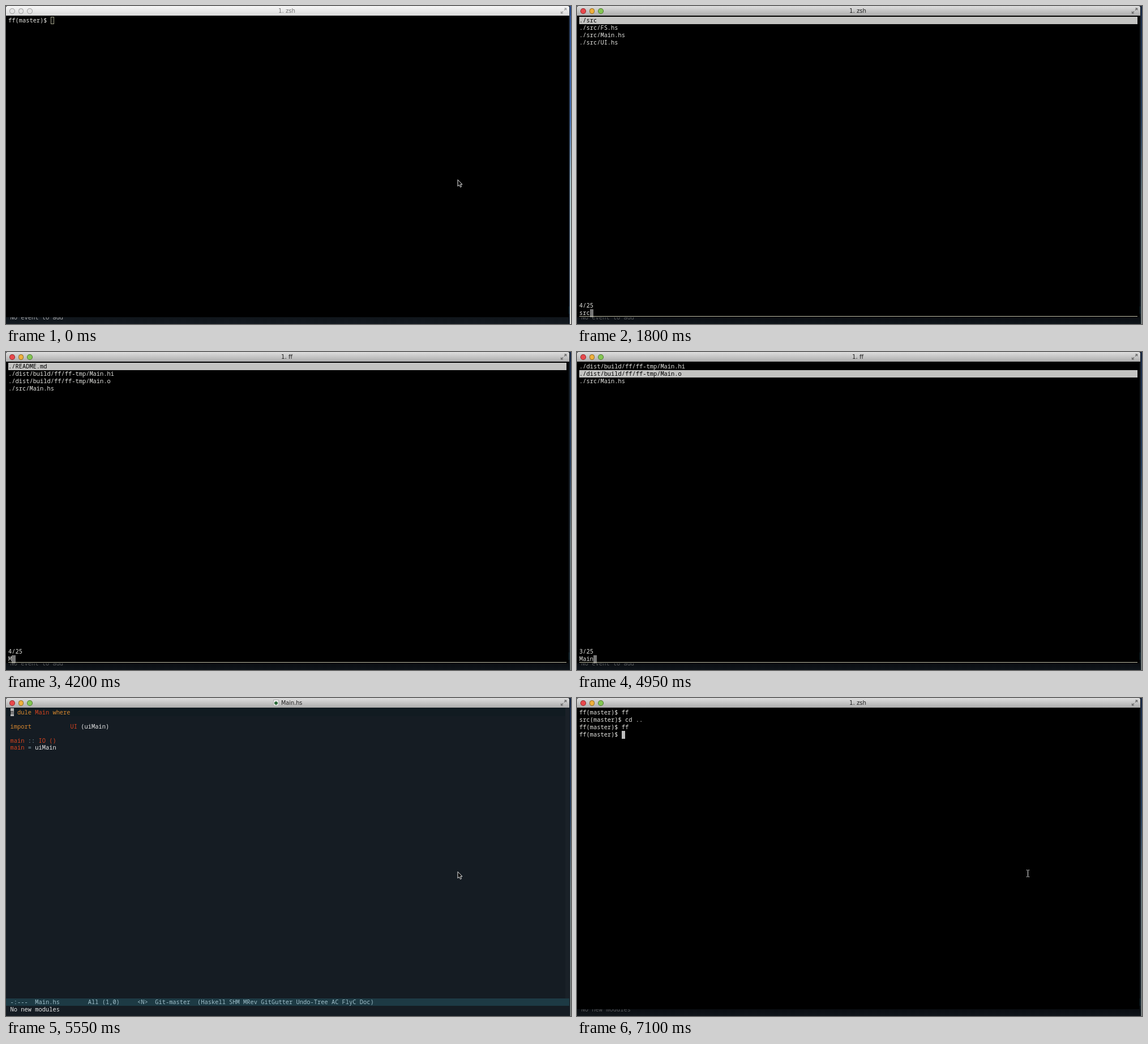
Recreate the animation shown at these times as an HTML page. Size 998 by 561 pixels, loop 7.3 s.

```html
<!DOCTYPE html>
<html lang="en">
<head>
<meta charset="utf-8">
<title>ff</title>
<style>
  html, body { margin: 0; width: 100%; height: 100%; overflow: hidden; background: #10151b; }
  #stage { position: relative; width: 998px; height: 561px; overflow: hidden; background: #151c23;
           font: 10.4px/13.25px "Noto Sans Mono", monospace; white-space: pre; }
  #stage * { box-sizing: border-box; }
  #stage div, svg { position: absolute; }

  #bar { left: 0; top: 0; width: 995px; height: 17px; border-radius: 3px 3px 0 0;
         background: linear-gradient(#dedede, #c8c8c8 45%, #acacac); }
  .idle #bar { background: linear-gradient(#f6f6f6, #dadada); }
  #title { left: 0; top: 1px; width: 992px; text-align: center; color: #222;
           font: 10.2px/16px "DejaVu Sans", sans-serif; }
  .editing #title { left: 486px; width: auto; font-size: 9.7px; }
  .idle #title { color: #777; }
  #doc { display: none; left: 472px; top: 3px; width: 10px; height: 11px;
         background: #f4f4f4; border: 1px solid #aaa; }
  #doc::after { content: ""; position: absolute; left: 1px; top: 2px; width: 6px; height: 6px;
                border-radius: 50%; background: #2f6b3c; }
  .editing #doc { display: block; }
  .light { top: 4px; width: 9.5px; height: 9.5px; border-radius: 50%; border: 1px solid #0006; }
  .idle .light { background: #e4e4e4 !important; border-color: #999; }
  .idle #expand { opacity: .6; }

  #edge { left: 995px; top: 0; width: 3px; height: 561px;
          background: linear-gradient(90deg, #101820 1px, #0000 2px),
                      linear-gradient(#1d3157, #2b4a72 35%, #87989a 60%, #9a9f9c); }
  .idle #edge { background: linear-gradient(90deg, #1c2a40 1px, #0000 1px),
                            linear-gradient(#2d4f92, #4673b8 35%, #a9c6cc 55%, #e2e2dc); }
  #line { left: 0; top: 17px; width: 995px; height: 15px; background: #111b21; }
  #gutter { left: 988px; top: 17px; width: 7px; height: 513px; background: #1a2128; }
  .code { left: 7.6px; line-height: 12.5px; color: #e8e8e8; }
  .code i { font-style: normal; color: #d8882f; }
  .code b { font-weight: normal; color: #d5431f; }
  .code u { text-decoration: none; color: #7f9ca8; }
  .code s { text-decoration: none; color: #222; background: #b5b5b5; }
  #mode { left: 0; top: 530px; width: 995px; height: 12.5px; padding-left: 7.6px;
          line-height: 13px; background: #1d3a44; color: #9fbfca; }

  #term { left: 0; top: 17px; width: 994px; height: 532px; background: #000; overflow: hidden; }
  #shade { left: 0; top: 549px; width: 995px; height: 12px;
           background: linear-gradient(#05070ab0, #080c1070); }
  .idle #shade { background: linear-gradient(#05070a50, #080c1020); }
  .editing #term, .editing #shade { display: none; }
  .row { left: 4px; width: 986px; height: 13.25px; color: #e4e4e0; }
  .picked { background: #c4c4c2; color: #000; }
  .rule { left: 4px; top: 530px; width: 986px; height: 1px; background: #c2c2ac; }
  .caret { display: inline-block; width: 6.3px; height: 13.25px; vertical-align: top; background: #bdbdbd; }
  .dim .caret { background: #777; }
  .idle .caret { background: none; border: 1px solid #a5a58c; }
  #arrow, #beam { display: none; }
  .arrow #arrow, .beam #beam { display: block; }
</style>
</head>
<body>
<div id="stage">
  <div id="line"></div>
  <div id="gutter"></div>
  <div class="code" style="top:18.75px"><s>m</s> <i>dule</i> <b>Main</b> <i>where</i>

<i>import</i>           <b>UI</b> (uiMain)

<b>main</b> <u>::</u> <b>IO ()</b>
<b>main</b> <u>=</u> uiMain</div>
  <div id="mode">-:---  Main.hs        All (1,0)     &lt;N&gt;  Git-master  (Haskell SHM MRev GitGutter Undo-Tree AC FlyC Doc)</div>
  <div id="echo" class="code" style="top:542.5px"></div>
  <div id="shade"></div>
  <div id="term"></div>
  <div id="edge"></div>
  <div id="bar">
    <div class="light" style="left:6px;background:#e8484c"></div>
    <div class="light" style="left:21.7px;background:#efb03c"></div>
    <div class="light" style="left:37.3px;background:#83c653"></div>
    <div id="doc"></div>
    <div id="title"></div>
    <svg id="expand" style="left:979px;top:3px" width="12" height="11" fill="none" stroke="#666" stroke-width="1.2">
      <path d="M7 4.500 10.500 1M7 1h3.500v3.500M5 6.500 1.500 10M1.500 6.500V10H5"/>
    </svg>
  </div>
  <svg id="arrow" style="left:797px;top:305px" width="12" height="17">
    <path d="M1 1.500V13l2.600-2.400 1.900 4 2-.9-1.900-3.900H9z" fill="#000" stroke="#eee"/>
  </svg>
  <svg id="beam" style="left:793px;top:303px" width="7" height="13" fill="none" stroke="#eee">
    <path d="M1 .5h1.500l1 1 1-1H6M3.500 1.500v10M1 12.500h1.500l1-1 1 1H6"/>
  </svg>
</div>
<script>
const LOOP = 7300;
const tmp = './dist/build/ff/ff-tmp';
const files = [
  './.gitignore', './LICENSE', './README.md', './Setup.hs', './dist', './dist/build',
  './dist/build/autogen', './dist/build/autogen/Paths_ff.hs', './dist/build/autogen/cabal_macros.h',
  './dist/build/ff', './dist/build/ff/ff', tmp,
  ...['FS', 'Main', 'UI'].flatMap(m => [`${tmp}/${m}.hi`, `${tmp}/${m}.o`]),
  './dist/package.conf.inplace', './dist/setup-config', './ff.cabal',
  './src', './src/FS.hs', './src/Main.hs', './src/UI.hs'
];

const caret = '<span class="caret"></span>';
const row = (text, i, cls = '') =>
  `<div class="row ${cls}" style="top:${1.6 + i * 13.25}px">${text}</div>`;

const shell = (...lines) => lines.map((text, i) =>
  row(i === lines.length - 1 ? text + caret : text, i)).join('');

function finder(query, picked = 0, cls = 'dim') {
  const hits = files.filter(f => f.includes(query));
  return hits.map((f, i) => row(f, i, i === picked ? 'picked' : '')).join('') +
    row(`${hits.length}/${files.length}`, 38) +
    row(query + caret, 39, cls) + '<div class="rule"></div>';
}

const ff = 'ff(master)$ ', src = 'src(master)$ ';
const back = [ff + 'ff', src + 'cd ..'];

// [start, terminal content, title, window state]
const scenes = [
  [0, shell(ff), '1. zsh', 'idle arrow'],
  [300, shell(ff)],
  [800, shell(ff + 'f')],
  [900, shell(ff + 'ff')],
  [1100, finder('')],
  [1400, finder('s')],
  [1550, finder('sr')],
  [1750, finder('src')],
  [2200, shell(back[0], src)],
  ...[...'cd ..'].map((_, i) => [2650 + i * 100, shell(back[0], src + 'cd ..'.slice(0, i + 1))]),
  [3450, shell(...back, ff)],
  [3700, shell(...back, ff + 'f')],
  [3800, shell(...back, ff + 'ff')],
  [3900, finder(''), '1. ff'],
  [4200, finder('M'), '1. ff'],
  [4300, finder('Ma'), '1. ff'],
  [4350, finder('Mai'), '1. ff'],
  [4450, finder('Main'), '1. ff'],
  [4950, finder('Main', 1), '1. ff'],
  [5150, finder('Main', 2), '1. ff'],
  [5350, finder('Main', 2, ''), '1. ff'],
  [5500, '', 'Main.hs', 'editing arrow'],
  [6950, shell(...back, ff + 'ff', ff), '1. zsh', 'beam']
];

const el = id => document.getElementById(id);
let shown;

function show(scene) {
  const [at, content, title = '1. zsh', state = ''] = scene;
  el('term').innerHTML = content;
  el('title').textContent = title;
  el('stage').className = state;
  el('echo').textContent = at < 5500 ? 'No event to add' : 'No new modules';
  shown = scene;
}

const start = performance.now();
function tick() {
  const t = (performance.now() - start) % LOOP;
  const scene = scenes.findLast(s => s[0] <= t);
  if (scene !== shown) show(scene);
  requestAnimationFrame(tick);
}
tick();
</script>
</body>
</html>
```
